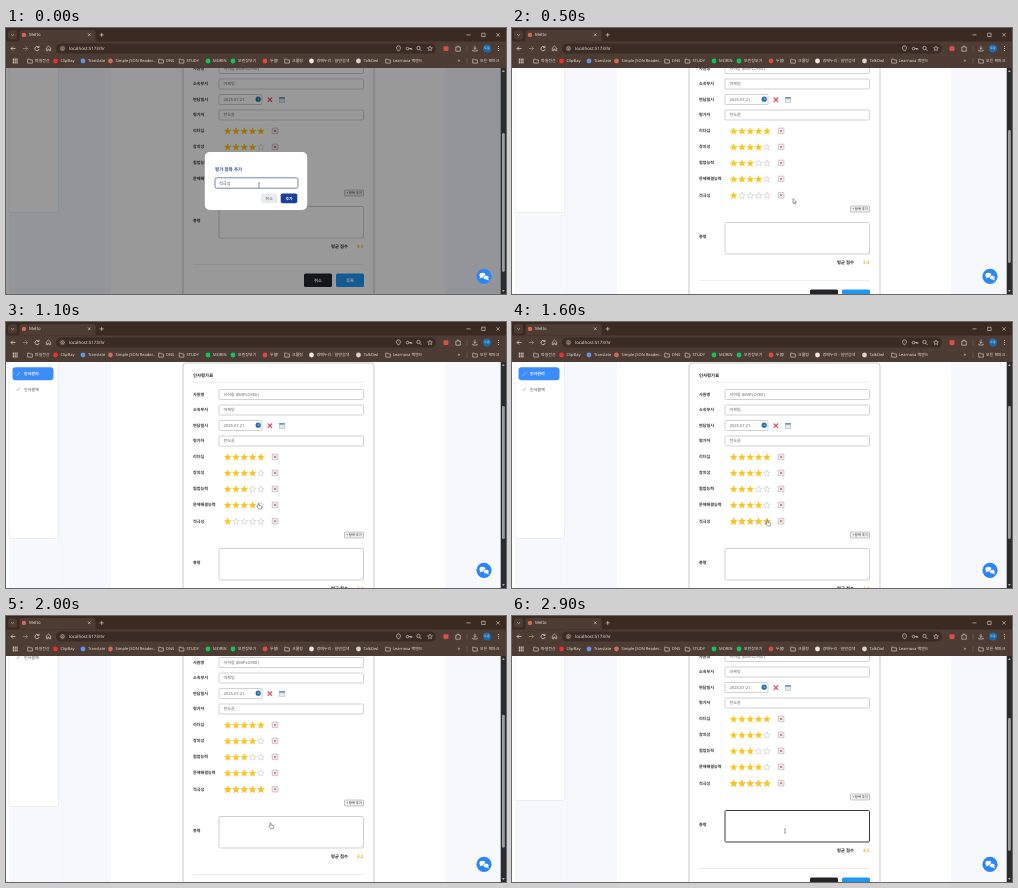
These frames come from a looping animation (500 by 266 pixels, 3000 ms). An HTML page:

```html
<!DOCTYPE html>
<html lang="ko">
<head>
<meta charset="utf-8">
<title>Review form</title>
<style>
html, body { margin: 0; width: 100%; height: 100%; overflow: hidden; background: #fff; }
svg { display: block; width: 500px; height: 266px; }
text { font-family: "Noto Sans", "Noto Sans CJK KR", "Noto Sans CJK", sans-serif; text-rendering: geometricPrecision; white-space: pre; }
</style>
</head>
<body>
<svg id="stage" viewBox="0 0 500 266"></svg>
<script>
const attrs = o => Object.entries(o).map(([k, v]) => ` ${k}="${v}"`).join('');
const rect = (x, y, width, height, fill, o = {}) => `<rect${attrs({ x, y, width, height, fill, ...o })}/>`;
const circle = (cx, cy, r, fill, o = {}) => `<circle${attrs({ cx, cy, r, fill, ...o })}/>`;
const ellipse = (cx, cy, rx, ry, fill, o = {}) => `<ellipse${attrs({ cx, cy, rx, ry, fill, ...o })}/>`;
const line = (d, stroke, w = .6, o = {}) => `<path${attrs({ d, stroke, 'stroke-width': w, fill: 'none', ...o })}/>`;
const shape = (d, fill, o = {}) => `<path${attrs({ d, fill, ...o })}/>`;
const text = (s, x, y, size, fill, o = {}) =>
  `<text${attrs({ x, y: y + size * .36, 'font-size': size, fill, ...o })}>${s}</text>`;
const group = (id, body, o = {}) => `<g${attrs({ id, ...o })}>${body}</g>`;
const bold = { 'font-weight': 700 };
const mid = { 'text-anchor': 'middle' };

const folder = (x, y) => line(`M${x - 2.3} ${y - 1.9}h1.8l.7.8h2.2v3.2h-4.7z`, '#ddd2cc', .6);

function chrome() {
  const ink = '#e6dcd7', bar = '#4d3c34', strip = '#3a2a22';
  let s = rect(0, 0, 500, 40, bar) + rect(0, 0, 500, 13.5, strip);
  s += rect(2, 2.3, 9, 9.3, bar, { rx: 2.5 }) + line('M5.2 6.3l1.4 1.4 1.4-1.4', ink);
  s += shape('M11.5 13.5q2 0 2-2V4.500q0-2.500 2.500-2.500H87q2.500 0 2.500 2.500v7q0 2 2 2z', bar);
  s += circle(18, 6.9, 2.2, '#d9684f') + text('Melto', 23, 6.8, 4.3, ink);
  s += line('M82 5.500l2.600 2.600m0-2.600l-2.600 2.600M95.700 4.900v4M93.700 6.900h4', ink);
  s += line('M460.500 6.900h4M475.700 5.200h3.400v3.400h-3.400zM490.300 5.200l3.400 3.400m0-3.400l-3.400 3.400', ink);

  s += line('M9.500 20.500h-4.500m2-2l-2 2 2 2', ink, .7);
  s += line('M17 20.500h4.500m-2-2l2 2-2 2', '#a3948c', .7);
  s += line('M32.600 19.200a2.100 2.100 0 1 0 .5 1.800M33 17.800v1.700h-1.700', ink, .7);
  s += line('M40.300 20l2.200-2 2.200 2v2.700h-1.500v-1.600h-1.400v1.600h-1.500z', ink);
  s += rect(50, 15.6, 380, 10, '#3a2b25', { rx: 5 });
  s += circle(56.5, 20.5, 3.2, bar) + circle(56.5, 20.5, 1.7, 'none', { stroke: ink, 'stroke-width': .5 }) + line('M56.500 20.200v1.300', ink, .5);
  s += text('localhost:5173/hr', 63, 20.4, 4.4, ink);
  s += line('M392.500 23.200q-2-2-2-3.400a2 2 0 0 1 4 0q0 1.400-2 3.400zM392.500 19.700v.4', ink);
  s += circle(401.5, 20.6, 1.3, 'none', { stroke: ink, 'stroke-width': .6 }) + line('M402.800 20.600h3v1.200m-1.300-1.200v1', ink, .7);
  s += circle(412.5, 20, 1.7, 'none', { stroke: ink, 'stroke-width': .6 }) + line('M413.800 21.300l1.600 1.600', ink, .7);
  s += star(424, 20.6, 2.6, 'none', ink, .5);
  s += rect(437.5, 18.2, 5, 4.8, '#d8513f', { rx: 1 });
  s += line('M449.800 19.200h1.400q-.2-1.400.8-1.400t.8 1.400h1.500v4h-4.500z', ink);
  s += line('M461 17.500v6', '#7b6a61', .5);
  s += line('M469 17.700v3.600m-1.600-1.500l1.600 1.600 1.600-1.600M466.800 21.800v1.200h4.400v-1.200', ink);
  s += circle(481, 20.5, 4, '#1b6cae') + text('도윤', 481, 20.4, 2.9, '#fff', mid);
  s += [18.4, 20.5, 22.6].map(y => circle(492.5, y, .5, ink)).join('');

  for (let i = 0; i < 9; i++) s += rect(6.8 + i % 3 * 1.8, 30.6 + Math.floor(i / 3) * 1.8, 1.2, 1.2, ink);
  const marks = [
    [24, '파일전산'], [49.5, 'ClipBay', '#e8322a'], [77, 'Translate', '#5f94e8'],
    [104.500, 'Simple JSON Reader...', '#cf6a55'], [155, 'DNS'], [175.500, 'STUDY'],
    [202, 'MORIN', '#12c25a'], [227, '모린장보기', '#12c25a'], [259, '두봄!', '#dd4a3e'],
    [281, '크롤링'], [305.500, '경매누리 - 일반검색', '#eee7e5'], [352.500, 'TalkOwl', '#d9d3d2'],
    [382, 'Learnova 백엔드'], [469, '모든 북마크']
  ];
  for (const [x, label, color] of marks) {
    s += color ? circle(x, 33, 2.4, color) : folder(x, 33);
    s += text(label, x + 5, 32.9, 4, ink);
  }
  return s + text('»', 451.5, 32.5, 5, ink) + line('M461 30v6', '#7b6a61', .5);
}

function star(x, y, r, fill, stroke, w) {
  let d = '';
  for (let i = 0; i < 10; i++) {
    const a = Math.PI * (i / 5 - .5), k = i % 2 ? r * .43 : r;
    d += `${i ? 'L' : 'M'}${(x + k * Math.cos(a)).toFixed(2)} ${(y + k * Math.sin(a)).toFixed(2)}`;
  }
  return shape(d + 'z', fill, { stroke, 'stroke-width': w, 'stroke-linejoin': 'round' });
}

const stars = (y, n) => [0, 1, 2, 3, 4].map(i => i < n
  ? star(221.7 + i * 8.3, y + .3, 3.7, '#fcc419', '#fcc419', .3)
  : star(221.7 + i * 8.3, y + .3, 3.5, '#fff', '#b8b8b8', .45)).join('');

const label = (s, y) => text(s, 187, y, 4.1, '#333', { 'font-weight': 600 });
const field = (y, value, w = 144.5) =>
  rect(213, y - 5, w, 10, '#fff', { rx: 1.2, stroke: '#b4b4b4', 'stroke-width': .6 }) + text(value, 217.5, y - .1, 4.1, '#666');
const rating = (name, y, n) => label(name, y) + stars(y, n) +
  rect(266.2, y - 2.9, 5.8, 5.6, '#f5f1f1', { stroke: '#999', 'stroke-width': .5, rx: .6 }) +
  line(`M268.100 ${y - 1.1}l2 2m0-2l-2 2`, '#dc4358', .8);

function page() {
  let s = rect(3, -20, 49.5, 204.5, '#fff', { stroke: '#e6e9ef', 'stroke-width': .7, rx: 2 });
  s += rect(6.5, 13.3, 41, 13, '#3b8dfb', { rx: 3 });
  s += line('M10.800 21.800l3.200-3.600', '#9cc5f5', 1) + text('인사관리', 18, 19.8, 4, '#fff', bold);
  s += line('M10.800 37l3.200-3.600', '#a5abb5', .9) + text('인사결재', 18, 35.2, 4, '#444');
  s += rect(177, 9, 191, 290, '#fff', { rx: 3, stroke: '#b4b4b4', 'stroke-width': .7 });
  s += text('인사평가표', 187, 21, 4.4, '#222', bold) + line('M187 28h170.500', '#ddd', .6);
  s += label('사원명', 40.5) + field(40.5, '서하람 (EMPLOYEE)');
  s += label('소속부서', 56) + field(56, '마케팅');
  s += label('면담일시', 71.5) + field(71.5, '2025.07.21.', 43);
  s += circle(252.2, 71.2, 2.6, '#2470ab') + line('M252.200 69.700v1.700h1.200', '#fff', .5);
  s += line('M261.700 69.500l4.400 4.400m0-4.400l-4.400 4.400', '#e5455f', 1.1);
  s += rect(273.2, 69.2, 5.6, 5.2, '#e3eaf0', { stroke: '#a3b3c1', 'stroke-width': .5 }) + rect(273.2, 69, 5.6, 1.7, '#6f98b8');
  s += label('평가자', 87) + field(87, '한도윤');
  s += rating('리더십', 103, 5) + rating('창의성', 119, 4) + rating('협업능력', 135, 3) + rating('문제해결능력', 151, 4);
  s += group('extra', rating('적극성', 167.3, 1) + group('full', stars(167.3, 5)));

  let low = rect(338.5, 178, 19, 6, '#f1f1f1', { stroke: '#8c8c8c', 'stroke-width': .5, rx: .8 });
  low += text('+ 항목 추가', 348, 180.9, 3.3, '#222', mid);
  low += label('총평', 208.5);
  low += rect(213, 194.5, 144.5, 31.5, '#fff', { id: 'memo', rx: 1.2 });
  low += line('M355 225l1.700-1.700M356.200 225l.6-.6', '#999', .3);
  low += line('M218 198v5', '#333', .5, { id: 'caret' });
  low += text('평균 점수', 325, 234.7, 4.3, '#222', bold);
  low += text('', 357.5, 234.7, 4.6, '#f5ae35', { id: 'score', 'text-anchor': 'end', ...bold });
  low += line('M187 252.500h170.500', '#ddd', .6);
  low += rect(298, 261.5, 28, 13.5, '#222428', { rx: 1.5 }) + text('취소', 312, 268, 4.2, '#fff', { ...mid, ...bold });
  low += rect(330, 261.5, 28, 13.5, '#2196f3', { rx: 1.5 }) + text('등록', 344, 268, 4.2, '#fff', { ...mid, ...bold });
  return s + group('low', low);
}

function modal() {
  return rect(0, 40, 495, 226, '#000', { opacity: .4 }) +
    rect(198.8, 124, 102.4, 58, '#fff', { rx: 5 }) +
    text('평가 항목 추가', 209, 141.8, 4.5, '#24479f', bold) +
    rect(209, 149.8, 83, 10.4, '#fff', { id: 'entry', rx: 1.5, 'stroke-width': .8 }) +
    text('적극성', 213, 155, 4.2, '#444') +
    rect(255, 165.5, 16.5, 9.7, '#e9ebef', { rx: 1.8 }) + text('취소', 263.2, 170.2, 3.9, '#555', mid) +
    rect(274.7, 165.5, 16.6, 9.7, '#1c3f9b', { id: 'add', rx: 1.8 }) + text('추가', 283, 170.2, 3.9, '#fff', { ...mid, ...bold });
}

const blue = '#2d86f5';
const chat = circle(478, 248.3, 7.6, blue) +
  ellipse(476.4, 247.2, 2.9, 2.4, '#fff') + shape('M474.200 248.200l-.5 2.200 2.200-.9z', '#fff') +
  ellipse(480.2, 249.6, 2.7, 2.2, '#fff', { stroke: blue, 'stroke-width': .6 }) + shape('M482.200 250.400l.6 2-2.100-.7z', '#fff');

const scrollbar = rect(494.7, 40, 5.3, 226, '#2c2c2c') +
  shape('M495.900 44l1.500-2 1.500 2zM495.900 262l1.500 2 1.500-2z', '#a5a5a5') +
  rect(496, 102, 2.8, 133, '#9d9d9d', { id: 'thumb', rx: 1.4 });

const pen = { stroke: '#333', 'stroke-width': .45, 'stroke-linejoin': 'round' };
const pointers =
  group('beam', line('M-.9 -2.200q.9 0 .9.6v3.200q0 .6-.9.6M.9 -2.200q-.9 0-.9.6m0 3.200q0 .6.9.6', '#444', .5)) +
  group('arrow', shape('M-1 -2.500v5l1.200-1.100.8 1.800.8-.4-.8-1.700h1.600z', '#fff', pen)) +
  group('hand', shape('M-1 -2.600q.6-.5 1 .1v2l2.300.6q.6.200.5.9l-.5 2h-2.700l-1.900-2.500q.3-.8 1.300 0z', '#fff', pen));

document.getElementById('stage').innerHTML =
  rect(0, 40, 500, 226, '#fff') + rect(3, 40, 492, 226, '#f6f8fc') + rect(105, 40, 334, 226, '#fff') +
  line('M55.800 40v226', '#eef1f7', .6) +
  group('page', page()) + group('modal', modal()) + chat + scrollbar + chrome() + group('mouse', pointers);

const $ = id => document.getElementById(id);
const show = (id, on) => $(id).setAttribute('visibility', on ? 'visible' : 'hidden');
const set = (id, o) => Object.entries(o).forEach(([k, v]) => $(id).setAttribute(k, v));

// Linear interpolation through [time, value] stops.
function track(stops, t) {
  const i = stops.findIndex(p => p[0] > t);
  if (i < 0) return stops[stops.length - 1][1];
  const [t0, a] = stops[i - 1], [t1, b] = stops[i];
  return a + (b - a) * (t - t0) / (t1 - t0);
}

const mouseX = [[0, 253], [100, 255], [400, 285], [500, 282], [700, 276], [1100, 253], [1400, 255], [1800, 257], [2200, 273]];
const mouseY = [[0, 157], [100, 158], [400, 173], [500, 173], [700, 175], [1100, 184], [1400, 198], [1800, 204], [2200, 215]];
const scroll = [[0, 0], [600, 0], [700, 7], [900, 27], [1000, 31], [1100, 32], [1700, 32], [1800, 28], [1900, 16], [2000, 6], [2200, 0]];

function draw(now) {
  const t = Math.floor((now - start) % 3000 / 100) * 100;
  const open = t < 500, rated = t >= 1500, focus = t >= 2300;
  const y = track(scroll, t);
  set('page', { transform: `translate(0 ${y})` });
  set('low', { transform: `translate(0 ${open ? -16 : 0})` });
  set('thumb', open ? { y: 105, height: 139 } : { y: 102 - y * .56, height: 133 });
  set('entry', { stroke: t < 400 ? '#4a68b4' : '#6a9ccb' });
  set('add', { fill: t < 400 ? '#1c3f9b' : '#2f5cb8' });
  set('memo', focus ? { stroke: '#3a3a3a', 'stroke-width': 1 } : { stroke: '#b4b4b4', 'stroke-width': .6 });
  $('score').textContent = open ? '4.0' : rated ? '4.2' : '3.4';
  show('modal', open);
  show('extra', !open);
  $('full').setAttribute('display', rated ? 'inline' : 'none');
  show('caret', focus && t < 2700);
  set('mouse', { transform: `translate(${track(mouseX, t)} ${track(mouseY, t)})` });
  const kind = t < 300 || t >= 2100 ? 'beam' : t < 400 || t >= 500 && t < 1000 ? 'arrow' : 'hand';
  for (const id of ['beam', 'arrow', 'hand']) show(id, id === kind);
}

const start = performance.now();
function tick() {
  draw(performance.now());
  requestAnimationFrame(tick);
}
tick();
</script>
</body>
</html>
```
